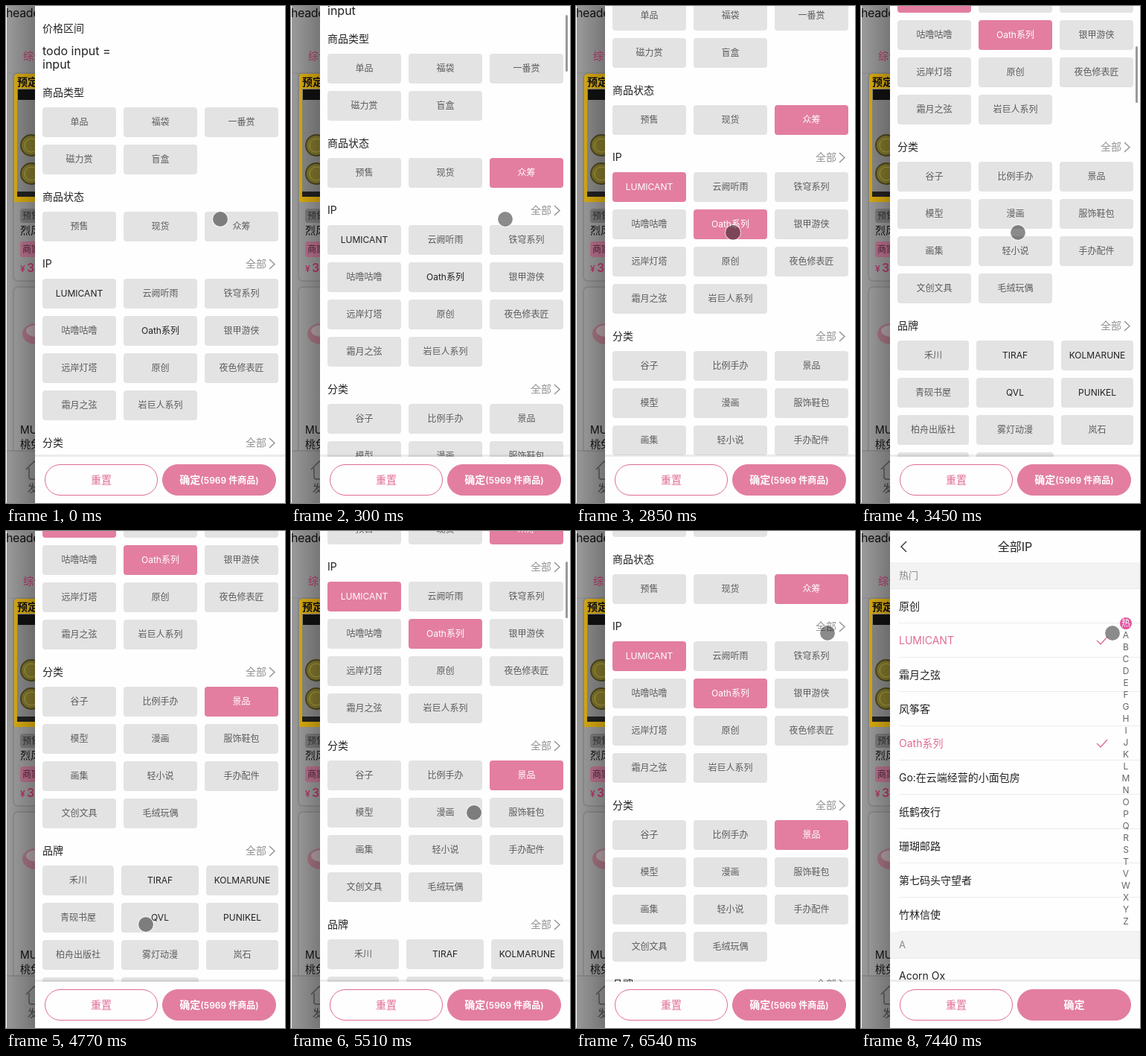
An HTML page that plays this animation: 375 px wide and 667 px high, repeating every 8 s.

```html
<!DOCTYPE html>
<html lang="zh-CN">
<head>
<meta charset="utf-8">
<title>Filter drawer</title>
<style>
  :root { --pink: #e37ea1; --line: #e06c96; }
  * { box-sizing: border-box; }
  html, body { margin: 0; width: 100%; height: 100%; overflow: hidden; background: #fff; }
  body { font: 14px/20px Inter, "Noto Sans CJK SC", "Noto Sans CJK", sans-serif; color: #222; }
  #stage { position: absolute; left: 0; top: 0; width: 375px; height: 667px; overflow: hidden; }
  #stage div, #stage svg { position: absolute; white-space: nowrap; }
  .behind { left: 0; top: 0; }
  #panel { left: 39px; top: 0; width: 336px; height: 667px; overflow: hidden; background: #fefefe; }
  #list { left: -39px; top: 0; width: 375px; height: 1100px; }
  #page { left: -39px; top: 0; width: 375px; height: 667px; visibility: hidden; }
  #page .bg { left: 39px; top: 0; width: 336px; height: 667px; background: #fefefe; }
  .chip { height: 40px; border-radius: 4px; background: #e3e3e3; font-size: 12px; line-height: 40px; text-align: center; }
  .cjk { color: #5c5c5c; }
  .chip.on { background: var(--pink); color: #fff; }
  .foot { left: 39px; top: 602px; width: 336px; height: 65px; background: #fefefe padding-box; border-top: 3px solid rgba(0,0,0,.07); }
  .btn { top: 10px; height: 42px; border-radius: 21px; border: 1px solid var(--line); line-height: 40px; text-align: center; color: var(--line); font-weight: 500; }
  .ok { background: var(--pink); border-color: var(--pink); color: #fff; font-weight: 600; }
  .ok small { font-size: 12px; }
  .group { left: 39px; width: 336px; height: 36px; background: #f3f3f3; border-bottom: 1px solid #e9e9e9; padding-left: 12px; font-size: 13px; line-height: 35px; color: #888; }
  .row { left: 51px; width: 324px; height: 46px; line-height: 46px; border-bottom: 1px solid #ebebeb; }
  .row.on { color: var(--line); }
  .idx { left: 348px; width: 16px; height: 16px; line-height: 16px; font-size: 12px; text-align: center; color: #666; }
  .idx.on { border-radius: 8px; background: #e0519b; color: #fff; }
  #bar { left: 330px; width: 3px; height: 76px; border-radius: 2px; background: #999; }
  #dot { left: -10px; top: -11px; width: 22px; height: 22px; border-radius: 50%; background: rgba(0,0,0,.45) padding-box; border: 1.5px solid rgba(255,255,255,.55); }
</style>
</head>
<body>
<div id="stage">
  <svg class="behind" width="40" height="667" font-size="14" fill="#111">
    <defs>
      <linearGradient id="shade"><stop offset=".1" stop-opacity="0"/><stop offset="1" stop-opacity=".22"/></linearGradient>
    </defs>
    <rect x="1" width="39" height="667" fill="#979797"/>
    <path d="M1 90H40" stroke="#8a8a8a"/>
    <text x="0" y="15" font-size="16" letter-spacing="-.4">header</text>
    <text x="23" y="72" fill="#b8346a">综合</text>
    <g fill="#9b9b9b" stroke="#8a8a8a" stroke-width="2">
      <rect x="10" y="90" width="60" height="279" rx="6"/>
      <rect x="10" y="377" width="60" height="240" rx="6"/>
    </g>
    <path d="M11 263V96q0-5 5-5H40V263Z" fill="#d9ab10"/>
    <rect x="15" y="111" width="25" height="138" fill="#8a8a8a"/>
    <text x="15" y="107" font-weight="700">预定</text>
    <rect x="16" y="112" width="24" height="14"/>
    <g fill="#81772b" stroke="#4c4720" stroke-width="2">
      <circle cx="34" cy="187" r="14"/><circle cx="34" cy="225" r="14"/>
    </g>
    <g fill="none" stroke="#aaa052"><circle cx="34" cy="187" r="9"/><circle cx="34" cy="225" r="9"/></g>
    <rect x="15" y="249" width="25" height="7" fill="#222"/>
    <rect x="19" y="272" width="30" height="19" rx="4" fill="#7c7c7c"/>
    <text x="22" y="286" font-size="12" fill="#333">预售</text>
    <text x="19" y="306">烈风</text>
    <rect x="19" y="316" width="30" height="21" rx="4" fill="#b8708c"/>
    <text x="22" y="331" font-size="12" fill="#52243a">商家</text>
    <text x="19" y="357" font-size="12" font-weight="600" fill="#b8346a">¥<tspan x="28" font-size="16">39</tspan></text>
    <ellipse cx="40" cy="440" rx="18" ry="14" fill="#a67382"/>
    <ellipse cx="42" cy="436" rx="15" ry="8" fill="#b1a2a6"/>
    <text x="19" y="574">MU</text>
    <text x="19" y="593">桃兔</text>
    <rect x="1" y="597" width="39" height="70" fill="#949494"/>
    <path d="M1 597H40" stroke="#868686" stroke-width="2"/>
    <path d="M27 622L38 611L49 622M31 620V632Q31 635 34 635H44" fill="none" stroke="#555" stroke-width="1.5"/>
    <text x="29" y="652" fill="#444">发现</text>
    <rect x="1" width="39" height="667" fill="url(#shade)"/>
  </svg>
  <div id="panel">
    <div id="list"></div>
    <div id="bar"></div>
    <div class="foot" style="left:0">
      <div class="btn" style="left:13px;width:152px">重置</div>
      <div class="btn ok" style="left:171px;width:153px">确定<small>(5969 件商品)</small></div>
    </div>
    <div id="page"></div>
  </div>
  <div id="dot"></div>
</div>
<script>
const $ = id => document.getElementById(id);
const list = $('list'), page = $('page'), bar = $('bar'), dot = $('dot');

function add(parent, cls, text, css) {
  const el = document.createElement('div');
  el.className = cls;
  el.textContent = text;
  for (const k in css) el.style[k] = typeof css[k] === 'number' ? css[k] + 'px' : css[k];
  parent.append(el);
  return el;
}
function line(parent, d, color) {
  parent.insertAdjacentHTML('beforeend',
    `<svg style="left:0;top:0" width="375" height="1100" fill="none" stroke="${color}" stroke-width="1.4"><path d="${d}"/></svg>`);
}

// Filter list
const even = [[49, 99], [158, 99], [267, 99]];
const uneven = [[49, 96], [155, 104], [269, 97]];
const picks = { 众筹: 150, LUMICANT: 2100, Oath系列: 2850, 景品: 4030 };
const sections = [
  ['商品类型', 116, '单品 福袋 一番赏 磁力赏 盲盒'],
  ['商品状态', 256, '预售 现货 众筹'],
  ['IP', 346, 'LUMICANT 云阙听雨 铁穹系列 咕噜咕噜 Oath系列 银甲游侠 远岸灯塔 原创 夜色修表匠 霜月之弦 岩巨人系列', true],
  ['分类', 586, '谷子 比例手办 景品 模型 漫画 服饰鞋包 画集 轻小说 手办配件 文创文具 毛绒玩偶', true],
  ['品牌', 826, '禾川 TIRAF KOLMARUNE 青砚书屋 QVL PUNIKEL 柏舟出版社 雾灯动漫 岚石 松果 海盐', true, uneven]
];
const chips = [];
add(list, '', '价格区间', { left: 49, top: 20 });
add(list, '', 'todo input =\ninput', { left: 49, top: 51, fontSize: 16, lineHeight: '18px', whiteSpace: 'pre' });
for (const [title, y, items, more, cols = even] of sections) {
  add(list, '', title, { left: 49, top: y - 10 });
  if (more) {
    add(list, '', '全部', { left: 322, top: y - 10, color: '#929292' });
    line(list, `M354 ${y - 6}l7 6.5l-7 6.5`, '#929292');
  }
  items.split(' ').forEach((name, i) => {
    const [left, width] = cols[i % 3];
    const el = add(list, /[A-Z]/.test(name) ? 'chip' : 'chip cjk', name,
      { left, width, top: y + 20 + 50 * Math.floor(i / 3) });
    if (name in picks) chips.push([el, picks[name]]);
  });
}

// Full list page
add(page, 'bg', '');
line(page, 'M61 14l-7 7l7 7', '#333');
add(page, '', '全部IP', { left: 39, width: 336, top: 11, fontSize: 16, textAlign: 'center' });
add(page, 'group', '热门', { top: 42 });
'原创 LUMICANT 霜月之弦 风筝客 Oath系列 Go:在云端经营的小面包房 纸鹤夜行 珊瑚邮路 第七码头守望者 竹林信使'
  .split(' ').forEach((name, i) => {
    const on = name in picks;
    add(page, on ? 'row on' : 'row', name, { top: 78 + 46 * i });
    if (on) line(page, `M317 ${101 + 46 * i}l5 5l9-10`, 'var(--line)');
  });
add(page, 'group', 'A', { top: 538 });
add(page, 'row', 'Acorn Ox', { top: 574 });
[...'热ABCDEFGHIJKLMNOPQRSTVWXYZ'].forEach((c, i) =>
  add(page, i ? 'idx' : 'idx on', c, { top: 116 + 16 * i }));
const foot = add(page, 'foot', '');
add(foot, 'btn', '重置', { left: 13, width: 152 });
add(foot, 'btn ok', '确定', { left: 171, width: 153 });

// Motion: [time, values...], linear between keys
const pointer = [
  [0, 287, 286], [450, 287, 286], [1050, 182, 254], [1500, 182, 254], [1800, 114, 247],
  [2100, 114, 247], [2400, 210, 304], [3450, 210, 304], [3900, 317, 232], [4180, 317, 232],
  [4330, 262, 382], [4620, 200, 503], [4770, 187, 528], [4920, 187, 528], [5350, 245, 378],
  [5800, 245, 378], [6090, 324, 334], [6240, 352, 220], [6390, 343, 150], [6540, 337, 137]
];
const scroll = [[150, 0], [450, 143], [3150, 143], [3300, 290], [3450, 397], [5350, 397], [5500, 300], [5640, 218]];
const fade = [
  [150, 0], [300, 1], [750, 1], [1050, 0], [3150, 0], [3300, 1], [4030, 1], [4330, 0],
  [5350, 0], [5500, 1], [6240, 1], [6540, 0]
];
const slide = [[7140, 336], [7290, 110], [7440, 0]];

function at(keys, t) {
  const i = keys.findIndex(k => k[0] > t);
  if (i === 0) return keys[0].slice(1);
  if (i < 0) return keys[keys.length - 1].slice(1);
  const a = keys[i - 1], b = keys[i], p = (t - a[0]) / (b[0] - a[0]);
  return a.slice(1).map((v, j) => v + (b[j + 1] - v) * p);
}

// The picture advances in steps of about 150 ms
function step(t) {
  const [from, len] = t < 3890 ? [0, 150] : t < 6536 ? [3890, 440 / 3] : [6540, 150];
  return from + Math.max(0, Math.floor((t - from + 4) / len)) * len;
}

const start = performance.now();
function draw() {
  const t = step((performance.now() - start) % 8000);
  const [x, y] = at(pointer, t), [s] = at(scroll, t);
  dot.style.transform = `translate(${x}px,${y}px)`;
  list.style.transform = `translateY(${-Math.round(s)}px)`;
  bar.style.top = 3 + s * .1285 + 'px';
  bar.style.opacity = at(fade, t)[0];
  for (const [el, on] of chips) el.classList.toggle('on', t >= on);
  page.style.visibility = t >= 7290 ? 'visible' : 'hidden';
  page.style.transform = `translateX(${at(slide, t)[0]}px)`;
  requestAnimationFrame(draw);
}
draw();
</script>
</body>
</html>
```
